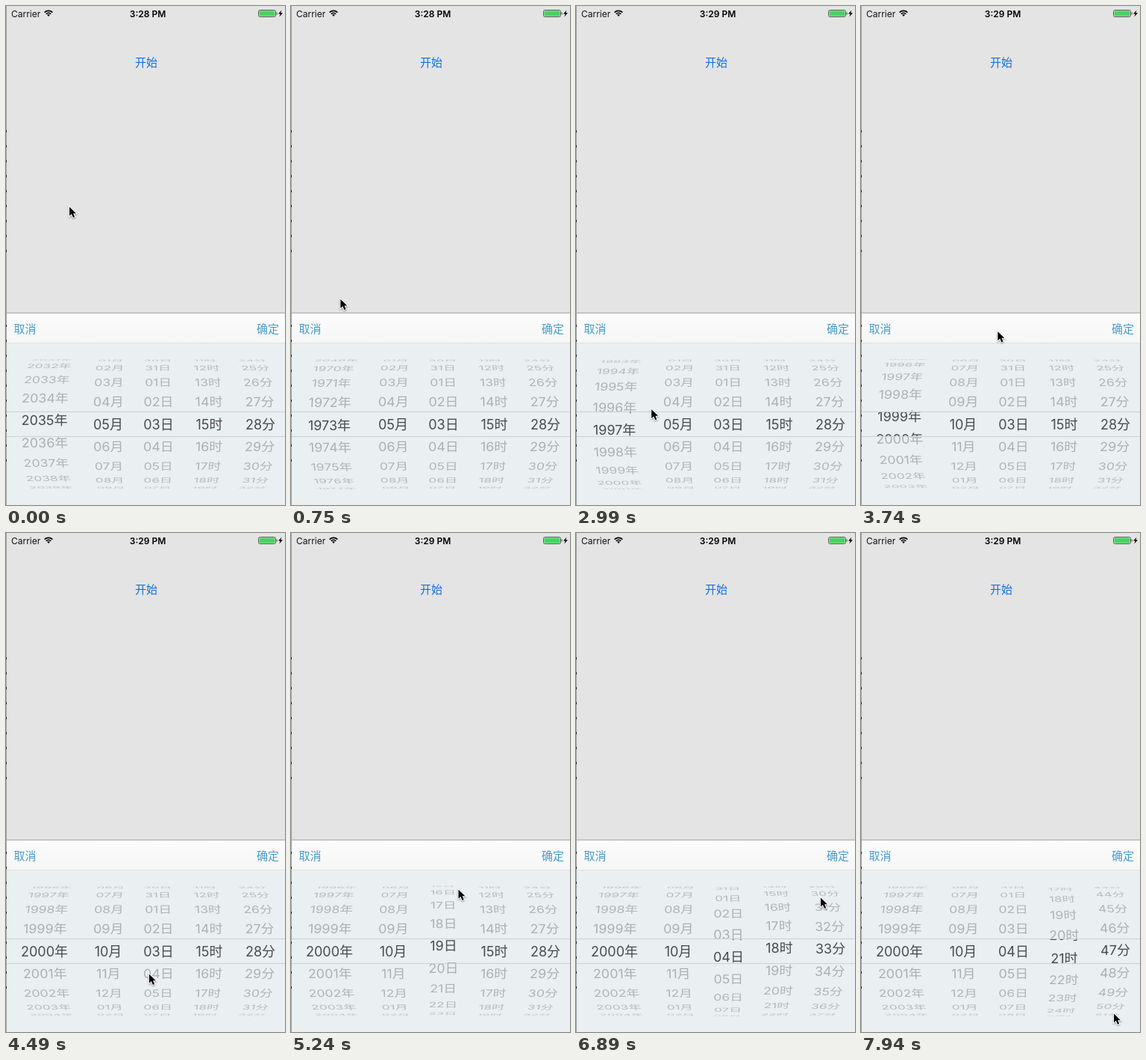
Animation, 374 px wide and 667 px high, one loop 8 s. Source, as an HTML page with a canvas:

```html
<!DOCTYPE html>
<html lang="zh">
<head>
<meta charset="utf-8">
<title>Date picker</title>
<style>
  html, body { margin: 0; width: 100%; height: 100%; overflow: hidden; background: #e4e4e4; }
  canvas { display: block; width: 374px; height: 667px; }
</style>
</head>
<body>
<canvas id="stage"></canvas>
<script>
const W = 374, H = 667, LOOP = 8000;
const FONT = 'Inter, "Noto Sans CJK SC", "Noto Sans CJK", sans-serif';
const canvas = document.getElementById('stage');
const ctx = canvas.getContext('2d');
const dpr = window.devicePixelRatio || 1;
canvas.width = W * dpr;
canvas.height = H * dpr;

// Wheel geometry: a cylinder seen in perspective
const MID = 559, CX = 187, R = 95.6, STEP = 0.321, DEPTH = 900, ROW = 30;
const BAND_TOP = 543, BAND_BOTTOM = 575;

const year = { x: 51.5, unit: '年', first: 1970, count: 80, start: 2024.54 };
const month = { x: 137, unit: '月', first: 1, count: 12, start: 5 };
const day = { x: 204.5, unit: '日', first: 1, count: 31, start: 3 };
const hour = { x: 272.5, unit: '时', first: 1, count: 24, start: 15 };
const minute = { x: 341, unit: '分', first: 0, count: 60, start: 28 };
const columns = [year, month, day, hour, minute];

// Each flick drags a wheel with the pointer, then lets it coast to rest.
// The pointer glides from one flick to the next.
const flicks = [
  { col: year, begin: -300, end: 0, from: [37, 587], to: [85, 268], rest: 2055, tau: 330 },
  { col: year, begin: 1790, end: 2275, from: [36, 593], to: [80, 291], rest: 2080, tau: 470 },
  { col: month, begin: 3140, end: 3440, from: [103, 560], to: [182, 410], rest: 10, tau: 470 },
  { col: day, begin: 4870, end: 5050, from: [194, 627], to: [214, 427], rest: 35, tau: 400 },
  { col: hour, begin: 5640, end: 5905, from: [257, 628], to: [265, 428], rest: 45, tau: 470 },
  { col: minute, begin: 6590, end: 6890, from: [328, 640], to: [328, 487], rest: 49, tau: 500 },
  { col: minute, begin: 7950, end: 8250, from: [339, 642], to: [339, 492], rest: 64, tau: 500 }
];

const lerp = (a, b, k) => a + (b - a) * k;
const smooth = k => k * k * (3 - 2 * k);
const mod = (a, n) => ((a % n) + n) % n;

// The picture advances every 150 ms, with one shorter step
const quantize = t => t < 1640
  ? Math.min(Math.floor(t / 150), 10) * 150
  : Math.floor((t + 10) / 150) * 150 - 10;

function pointerAt(t) {
  const i = flicks.findLastIndex(f => t >= f.begin);
  const f = flicks[i], next = flicks[i + 1];
  const move = (a, b, k) => a.map((v, j) => lerp(v, b[j], k));
  if (t <= f.end) return move(f.from, f.to, (t - f.begin) / (f.end - f.begin));
  return move(f.to, next.from, smooth((t - f.end) / (next.begin - f.end)));
}

function wheelAt(col, t) {
  let value = col.start;
  for (const f of flicks) {
    if (f.col !== col || t < f.begin) continue;
    const dragged = (f.from[1] - f.to[1]) / ROW;
    if (t < f.end) return value + dragged * (t - f.begin) / (f.end - f.begin);
    const left = (f.rest - value - dragged) * Math.exp((f.end - t) / f.tau);
    value = left < 0.15 ? f.rest : f.rest - left;
  }
  return value;
}

function rect(x, y, w, h, color) {
  ctx.fillStyle = color;
  ctx.fillRect(x, y, w, h);
}

function text(str, x, y, size, color, align = 'center', weight = 400) {
  ctx.font = `${weight} ${size}px ${FONT}`;
  ctx.textAlign = align;
  ctx.fillStyle = color;
  ctx.fillText(str, x, y);
}

function polygon(points, color) {
  ctx.beginPath();
  points.forEach(([x, y]) => ctx.lineTo(x, y));
  ctx.closePath();
  ctx.fillStyle = color;
  ctx.fill();
}

function clipped(top, bottom, draw) {
  ctx.save();
  ctx.beginPath();
  ctx.rect(1, top, W, bottom - top);
  ctx.clip();
  draw();
  ctx.restore();
}

function drawWheel(col, t, dark) {
  const pos = wheelAt(col, t);
  const offset = col.x - CX;
  for (let row = Math.ceil(pos - 4.7); row <= pos + 4.7; row++) {
    const a = (row - pos) * STEP, sin = Math.sin(a), cos = Math.cos(a);
    const s = DEPTH / (DEPTH + R * (1 - cos));
    const height = s * cos - s * s * R * sin * sin / DEPTH;
    if (height < 0.03) continue;
    const n = col.first + mod(row - col.first, col.count);
    const color = dark ? 'rgba(0,0,0,.69)' : `rgba(0,0,0,${0.16 + 0.11 * cos})`;
    ctx.save();
    ctx.transform(s, 0, -offset * s * s * sin / DEPTH, height, CX + offset * s, MID + R * sin * s);
    text(String(n).padStart(2, '0') + col.unit, 0, 6.5, 18, color);
    ctx.restore();
  }
}

function drawPicker(t) {
  rect(1, 451, W, H - 451, '#eaeff2');
  const wheels = dark => () => columns.forEach(c => drawWheel(c, t, dark));
  clipped(471, BAND_TOP, wheels(false));
  clipped(BAND_BOTTOM, 647, wheels(false));
  clipped(BAND_TOP, BAND_BOTTOM, wheels(true));
  rect(1, BAND_TOP - 1, W, 1, '#cbd0d2');
  rect(1, BAND_BOTTOM, W, 1, '#cbd0d2');
}

function drawToolbar() {
  const g = ctx.createLinearGradient(0, 411, 0, 450);
  g.addColorStop(0, '#fcfcfc');
  g.addColorStop(1, '#f6f6f6');
  rect(1, 409, W, 1, '#d6d6d6');
  rect(1, 410, W, 1, '#b2b2b2');
  rect(1, 411, W, 39, g);
  rect(1, 450, W, 1, '#dde1e3');
  text('取消', 10.5, 437, 15, '#469bca', 'left');
  text('确定', 366, 437, 15, '#469bca', 'right');
}

function drawStatus(t) {
  text('Carrier', 7, 14.5, 12, '#111', 'left');
  text(t < 2690 ? '3:28 PM' : '3:29 PM', 190, 14.5, 12, '#000', 'center', 600);

  ctx.strokeStyle = '#000';
  ctx.lineWidth = 1.6;
  [4.6, 7.6].forEach(r => {
    ctx.beginPath();
    ctx.arc(57, 14, r, -Math.PI * 0.75, -Math.PI * 0.25);
    ctx.stroke();
  });
  polygon([[57, 14], [55, 11.8], [57, 11], [59, 11.8]], '#000');

  ctx.lineWidth = 1;
  ctx.strokeStyle = '#5c5c5c';
  ctx.beginPath();
  ctx.roundRect(338.5, 5.5, 23, 9, 2);
  ctx.stroke();
  rect(339.5, 6.5, 21, 7, '#48d45f');
  rect(362.5, 8.5, 1.2, 3, '#5c5c5c');
  polygon([[369.5, 5.5], [365, 10.6], [367.7, 10.6], [366.3, 14.5], [371, 9.2], [368.2, 9.2]], '#000');
}

// Sliver of the window behind
function drawEdge() {
  rect(0, 0, 1, H, '#a2a2a2');
  for (let y = 166; y < 620; y += 20) {
    if (y < 330 || y > 420) rect(0, y, 1, 3, '#222');
  }
}

function drawPointer(t) {
  const [x, y] = pointerAt(t);
  const arrow = [[0, 0.6], [0, 12.6], [2.9, 9.9], [5, 14.8], [7.2, 13.9], [5.1, 9.2], [8.9, 9.2]];
  ctx.save();
  ctx.translate(x, y);
  ctx.shadowColor = 'rgba(0,0,0,.35)';
  ctx.shadowBlur = 2 * dpr;
  ctx.shadowOffsetY = dpr;
  polygon(arrow, '#fff');
  ctx.strokeStyle = '#fff';
  ctx.lineWidth = 2;
  ctx.stroke();
  ctx.shadowColor = 'transparent';
  polygon(arrow, '#000');
  ctx.restore();
}

function draw(t) {
  ctx.setTransform(dpr, 0, 0, dpr, 0, 0);
  rect(0, 0, W, H, '#e4e4e4');
  drawStatus(t);
  text('开始', 188, 80.5, 15, '#0a70e0');
  drawPicker(t);
  drawToolbar();
  drawEdge();
  drawPointer(t);
}

const begin = performance.now();
function tick() {
  draw(quantize((performance.now() - begin) % LOOP));
  requestAnimationFrame(tick);
}
tick();
</script>
</body>
</html>
```
